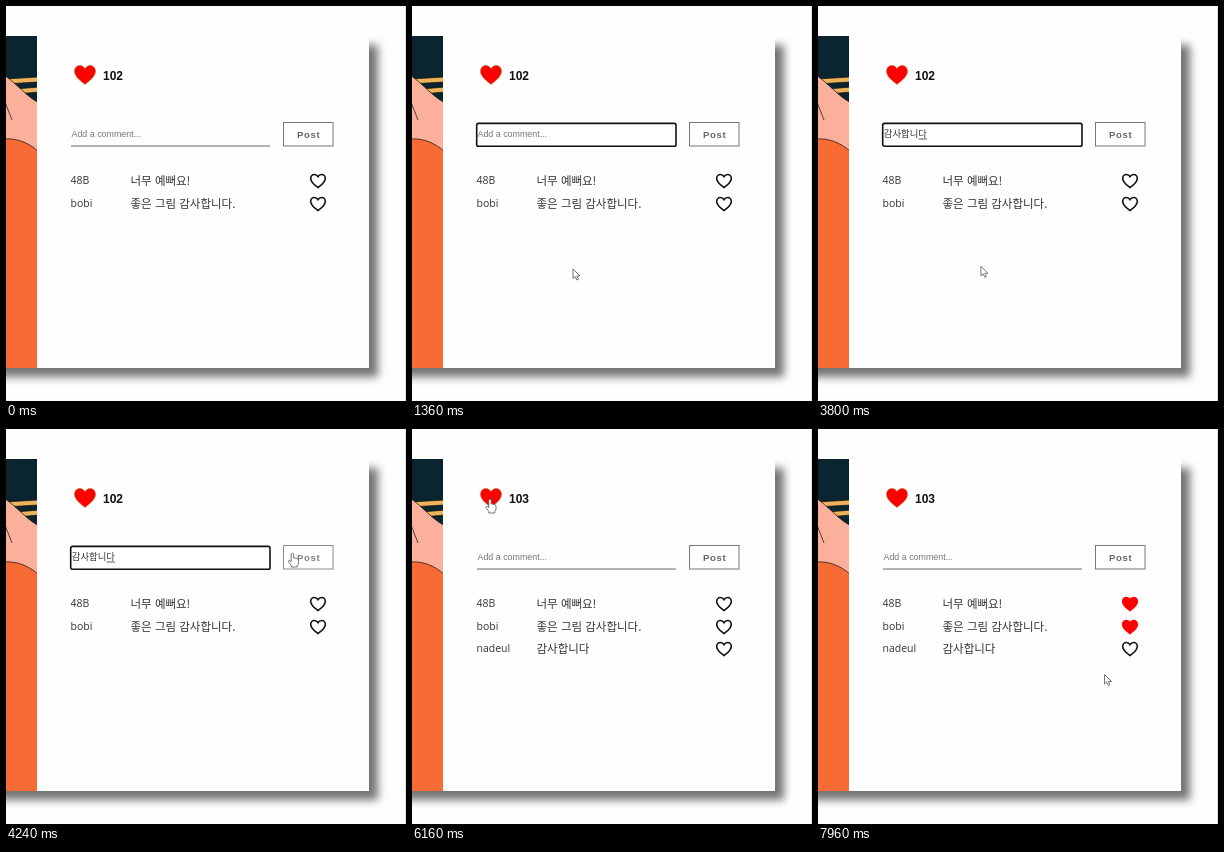
These frames come from a looping animation (400 px wide and 395 px high, 8 s). An HTML page:

```html
<!DOCTYPE html>
<html lang="ko">
<head>
<meta charset="utf-8">
<title>Comments</title>
<style>
  html, body { margin: 0; width: 100%; height: 100%; overflow: hidden; background: #fefefe; }
  svg { display: block; width: 400px; height: 395px; }
  .ko { font-family: "Noto Sans CJK KR", "Noto Sans CJK", sans-serif; }
  .row { font-size: 11.5px; fill: #333; }
  .row .user { font: 10.5px "Open Sans", "Noto Sans", sans-serif; }
  .ui { font-family: "Liberation Sans", Arial, sans-serif; }
  .small { stroke: #111; stroke-width: 2.2; fill: #fff; }
  .small.liked { stroke: #fe0000; fill: #fe0000; }
  #post { fill: #fff; stroke: #777; }
  #post text { fill: #666; stroke: none; font-size: 9.5px; font-weight: 700; letter-spacing: .7px; }
  #post.hover { stroke: #8d8d8d; }
  #post.hover text { fill: #808080; }
  .cursor { fill: #fff; stroke: #555; stroke-width: .8; stroke-linejoin: round; }
</style>
</head>
<body>
<svg viewBox="0 0 400 395">
  <defs>
    <filter id="blur" x="-10%" y="-10%" width="120%" height="120%"><feGaussianBlur stdDeviation="4"/></filter>
    <clipPath id="frame"><rect y="30" width="31" height="332"/></clipPath>
    <path id="heart" d="M0 9C-3 6.5-10 2-10-3.5C-10-7-7.5-9-5-9C-2.5-9-.8-7.5 0-6C.8-7.5 2.5-9 5-9C7.5-9 10-7 10-3.5C10 2 3 6.5 0 9Z"/>
  </defs>
  <rect width="400" height="395" fill="#fefefe"/>
  <path d="M399.5 0V395" stroke="#dedede"/>
  <rect x="-60" y="39" width="432" height="332" fill="#757575" filter="url(#blur)"/>
  <rect x="-60" y="30" width="423" height="332" fill="#fefefe"/>

  <g clip-path="url(#frame)">
    <rect y="30" width="31" height="332" fill="#0b2530"/>
    <g stroke="#111" stroke-width=".7" fill="#eeb259">
      <path d="M-2 73L33 71V76L-2 78Z"/>
      <path d="M-2 84L33 81V86L-2 89Z"/>
      <path d="M-2 69C10 77 20 90 33 97V150H-2Z" fill="#fab09a"/>
      <path d="M-2 133C10 132 22 136 33 146V364H-2Z" fill="#f86b34"/>
      <path d="M-1 96L6 114" fill="none"/>
    </g>
  </g>

  <use href="#heart" transform="translate(79 69) scale(1.05)" fill="#fe0000" stroke="#a86a10" stroke-width=".5"/>
  <text id="count" class="ui" x="97" y="74" font-size="12" font-weight="700" fill="#111">102</text>

  <path id="line" d="M65 140H264" stroke="#666"/>
  <rect id="focus" x="64.7" y="117.4" width="199.3" height="22.8" rx="1.8" fill="#fff" stroke="#111" stroke-width="1.6"/>
  <text id="hint" class="ui" x="65.5" y="131.3" font-size="8.9" fill="#777">Add a comment...</text>
  <text id="typed" class="ko" x="65.8" y="131.4" font-size="9.4" fill="#333"></text>
  <path id="compose" stroke="#333" stroke-width=".8"/>

  <g id="post" class="ui">
    <rect x="277.5" y="116.5" width="49.5" height="23.5"/>
    <text x="291" y="131.5">Post</text>
  </g>
  <g id="rows"></g>

  <g id="pointer">
    <path id="arrow" class="cursor" d="M0 0V9.5L2.2 7.5L3.8 11L5.4 10.3L3.9 7H7Z"/>
    <path id="hand" class="cursor" d="M-1.3 1Q0-.8 1.2 1V5Q2.3 4.3 3 5.4Q4.2 4.8 4.7 6Q6 5.7 6 7.2V9.6Q6 11.5 4.8 12.5V14H-1.2V12.5L-4 8.6Q-4 6.9-2.6 7.5L-1.3 8.8Z"/>
    <path id="beam" d="M-2-5.5Q0-5.5 0-4.5Q0-5.5 2-5.5M0-4.5V4.5M-2 5.5Q0 5.5 0 4.5Q0 5.5 2 5.5" fill="none" stroke="#333" stroke-width=".9"/>
  </g>
</svg>
<script>
const LOOP = 8000, STEP = 40;
const FOCUS = 880, BLUR = 4440, POSTED = 4520, COUNTED = 6160;
const $ = id => document.getElementById(id);
const show = (el, on) => { el.style.display = on ? "" : "none"; };

const comments = [
  { user: "48B", text: "너무 예뻐요!", y: 175, from: 0, liked: 7240 },
  { user: "bobi", text: "좋은 그림 감사합니다.", y: 198, from: 0, liked: 7640 },
  { user: "nadeul", text: "감사합니다", y: 220, from: POSTED, liked: Infinity }
];

$("rows").innerHTML = comments.map(c => `
  <g class="row">
    <text class="user" x="64.5" y="${c.y + 3.3}">${c.user}</text>
    <text class="ko" x="124.5" y="${c.y + 3.6}">${c.text}</text>
    <use href="#heart" class="small" transform="translate(312 ${c.y}) scale(.73)"/>
  </g>`).join("");
const rows = [...$("rows").children];

// Text in the input while the syllables are composed
const typing = [
  [1840, "ㄱ"], [1920, "가"], [1960, "감"], [2000, "감ㅅ"], [2080, "감사"],
  [2240, "감샇"], [2320, "감사해"], [2440, "감사햅"], [2680, "감사해"],
  [2840, "감사ㅎ"], [2920, "감사하"], [3000, "감사합"], [3080, "감사합ㄴ"],
  [3200, "감사합니"], [3280, "감사합니다"]
];

// Pointer stops: time, x, y
const stops = [
  [0, -12, 215], [400, 62, 176], [800, 150, 128], [880, 150, 128],
  [1360, 161, 263], [3760, 161, 263], [4240, 286.5, 124], [4520, 297, 129],
  [4680, 297, 129], [5200, 94.5, 88.5], [5520, 80, 72], [5720, 78, 70],
  [6360, 78, 70], [6880, 288, 203], [7120, 310, 174], [7240, 310, 174],
  [7360, 310, 174], [7560, 311, 197], [7640, 311, 197], [7960, 286.5, 245.5], [8000, 286.5, 245.5]
];

function slope(i, axis) {
  const a = stops[i - 1], b = stops[i], c = stops[i + 1];
  if (!a || !c || (b[axis] - a[axis]) * (c[axis] - b[axis]) <= 0) return 0;
  return (c[axis] - a[axis]) / (c[0] - a[0]);
}

function pointerAt(t, axis) {
  const i = Math.max(0, stops.findIndex(s => s[0] > t) - 1);
  const a = stops[i], b = stops[i + 1], d = b[0] - a[0], u = (t - a[0]) / d;
  const v = 1 - u;
  return a[axis] * (1 + 2 * u) * v * v + slope(i, axis) * d * u * v * v
    + b[axis] * u * u * (3 - 2 * u) - slope(i + 1, axis) * d * u * u * v;
}

const inside = (x, y, l, t, r, b) => x >= l && x <= r && y >= t && y <= b;

function draw(t) {
  const focused = t >= FOCUS && t < BLUR;
  const entry = typing.filter(e => e[0] <= t).pop();
  const text = entry && t < POSTED ? entry[1] : "";
  show($("focus"), focused);
  show($("line"), !focused);
  show($("hint"), !text);
  $("typed").textContent = text;
  show($("compose"), text && focused);
  const end = 65.8 + text.length * 8.65;
  $("compose").setAttribute("d", `M${end - 8.4} 133H${end}`);

  $("count").textContent = t < COUNTED ? 102 : 103;
  comments.forEach((c, i) => {
    show(rows[i], t >= c.from);
    rows[i].lastElementChild.classList.toggle("liked", t >= c.liked);
  });

  const x = pointerAt(t, 1), y = pointerAt(t, 2);
  const onPost = inside(x, y, 277, 116, 328, 141);
  const onHeart = inside(x, y, 62, 55, 122, 93)
    || comments.some(c => t >= c.from && inside(x, y, 303, c.y - 9, 321, c.y + 9));
  const kind = onPost || onHeart ? "hand" : inside(x, y, 64, 116, 265, 141) ? "beam" : "arrow";
  $("post").classList.toggle("hover", onPost);
  for (const id of ["arrow", "hand", "beam"]) show($(id), id === kind);
  show($("pointer"), t > 0);
  $("pointer").setAttribute("transform", `translate(${x.toFixed(2)} ${y.toFixed(2)})`);
}

const start = performance.now();
function tick(now) {
  const t = Math.max(0, now - start) % LOOP;
  draw(Math.floor(t / STEP) * STEP);
  requestAnimationFrame(tick);
}
draw(0);
requestAnimationFrame(tick);
</script>
</body>
</html>
```
